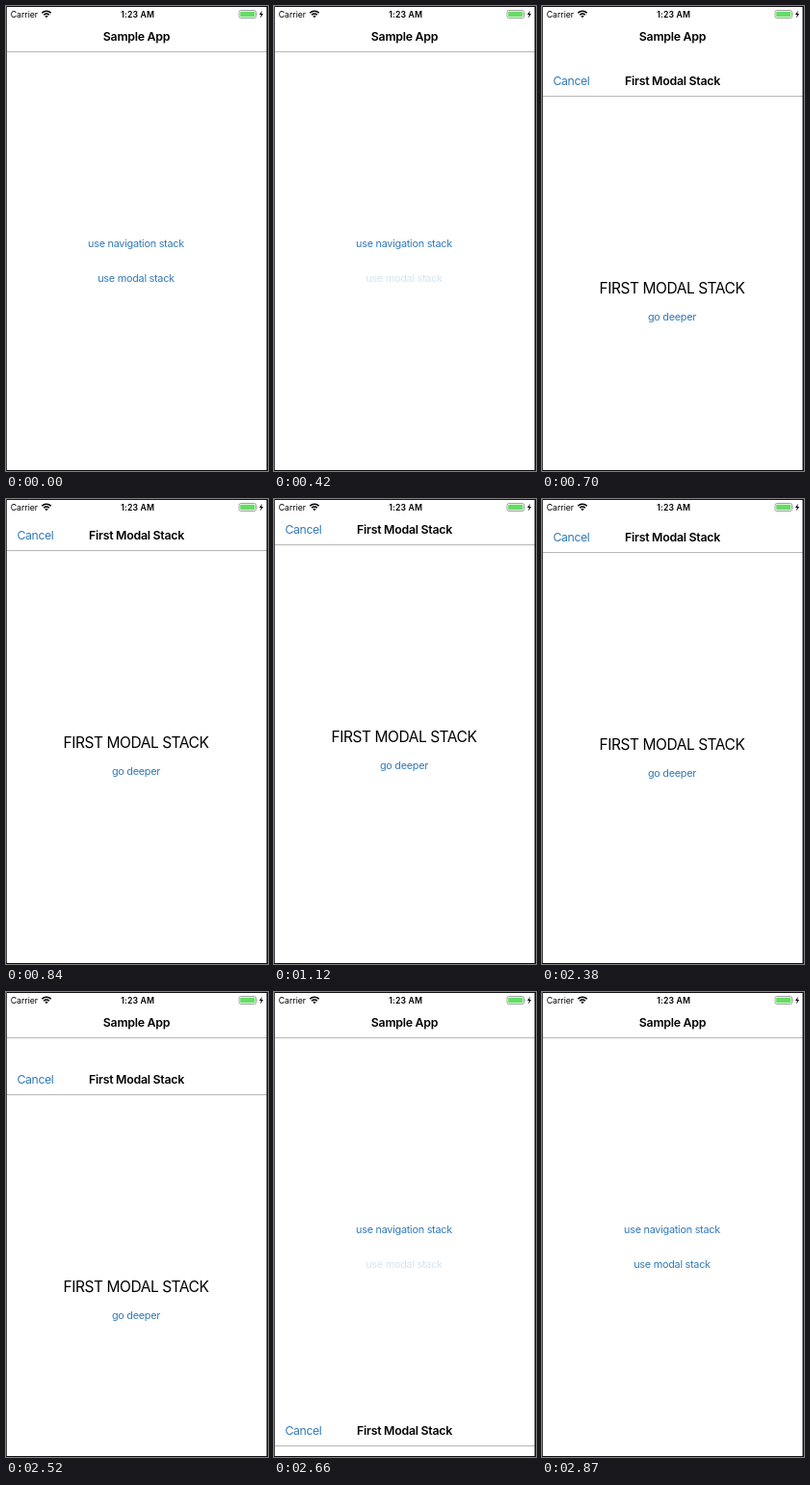
Write an HTML page that moves like this. It is 272x482 px and loops after 3.15 s.

```html
<!DOCTYPE html>
<html lang="en">
<head>
<meta charset="utf-8">
<title>Modal stack demo</title>
<style>
html, body { margin: 0; width: 100%; height: 100%; overflow: hidden; background: #fff; }
svg { display: block; width: 272px; height: 482px; }
text { font-family: Inter, "Liberation Sans", sans-serif; fill: #000; }
.mid { text-anchor: middle; }
.title { font-size: 12.33px; font-weight: 600; letter-spacing: -.021em; }
.link { font-size: 10.88px; letter-spacing: -.025em; fill: #337ab7; }
.back { font-size: 12.33px; letter-spacing: -.034em; fill: #337ab7; }
.big { font-size: 15.5px; letter-spacing: -.028em; }
.status { font-size: 8.7px; }
.clock { font-weight: 600; letter-spacing: .02em; }
.rule { fill: #b7b7b7; }
</style>
</head>
<body>
<svg viewBox="0 0 272 482">
  <rect width="272" height="482" fill="#fff"/>

  <g id="home">
    <text class="title mid" x="135.5" y="35.5">Sample App</text>
    <rect class="rule" y="47" width="271" height="1"/>
    <text class="link mid" x="135" y="250">use navigation stack</text>
    <text class="link mid" id="pressed" x="135" y="286">use modal stack</text>
  </g>

  <g id="modal">
    <rect width="271" height="482" fill="#fff"/>
    <text class="back" x="11.5" y="35.5">Cancel</text>
    <text class="title mid" x="135.5" y="35.5">First Modal Stack</text>
    <rect class="rule" y="47" width="271" height="1"/>
    <text class="big mid" x="135" y="252">FIRST MODAL STACK</text>
    <text class="link mid" x="135" y="279.7">go deeper</text>
  </g>

  <g id="status">
    <text class="status" x="4.7" y="11.7">Carrier</text>
    <g fill="none" stroke="#000" stroke-width="1.6">
      <path d="M37.3 7.2a6.6 6.6 0 0 1 9.4 0"/>
      <path d="M39.2 9.3a4 4 0 0 1 5.6 0"/>
    </g>
    <path d="M40.4 10.5a2.3 2.3 0 0 1 3.2 0L42 12.2z"/>
    <text class="status clock mid" x="136.7" y="11.7">1:23 AM</text>
    <rect x="242" y="4.5" width="17.6" height="8" rx="1.8" fill="#fff" stroke="#8c8c8c" stroke-width=".8"/>
    <rect x="243.2" y="5.7" width="15.2" height="5.6" rx=".8" fill="#66dc66"/>
    <path d="M260.6 7.1q1.2 1.4 0 2.8z" fill="#8c8c8c"/>
    <path d="M265.9 4.8l-2.9 4.2h1.8l-.7 3.4 2.9-4.4h-1.8z"/>
  </g>

  <g id="frame" fill="#111">
    <rect width="272" height="1"/>
    <rect width="1" height="482" fill="#444"/>
    <rect x="270.5" width="1.5" height="482"/>
    <rect y="481" width="272" height="1"/>
  </g>
</svg>
<script>
const LOOP = 3150, STEP = 70, HIDDEN = 482;
const PRESS = 420, RELEASE = 2870, OPEN = 560, CLOSE = 2100;
// Distance of the sheet from its resting place, one entry per step.
const rise = [423, 146, 46, 16, 6, 2, 1, 0];
const fall = [0, 0.5, 1, 3, 8, 21, 59, 146, 423, HIDDEN];

const modal = document.getElementById("modal");
const pressed = document.getElementById("pressed");

const pick = (list, since) => list[Math.min(list.length - 1, Math.floor(since / STEP))];

function offset(t) {
  if (t < OPEN) return HIDDEN;
  return t < CLOSE ? pick(rise, t - OPEN) : pick(fall, t - CLOSE);
}

function draw(now) {
  const t = now % LOOP;
  modal.setAttribute("transform", `translate(0 ${offset(t)})`);
  pressed.setAttribute("opacity", t >= PRESS && t < RELEASE ? 0.2 : 1);
}

const start = performance.now();
function tick() {
  draw(performance.now() - start);
  requestAnimationFrame(tick);
}
tick();
</script>
</body>
</html>
```
